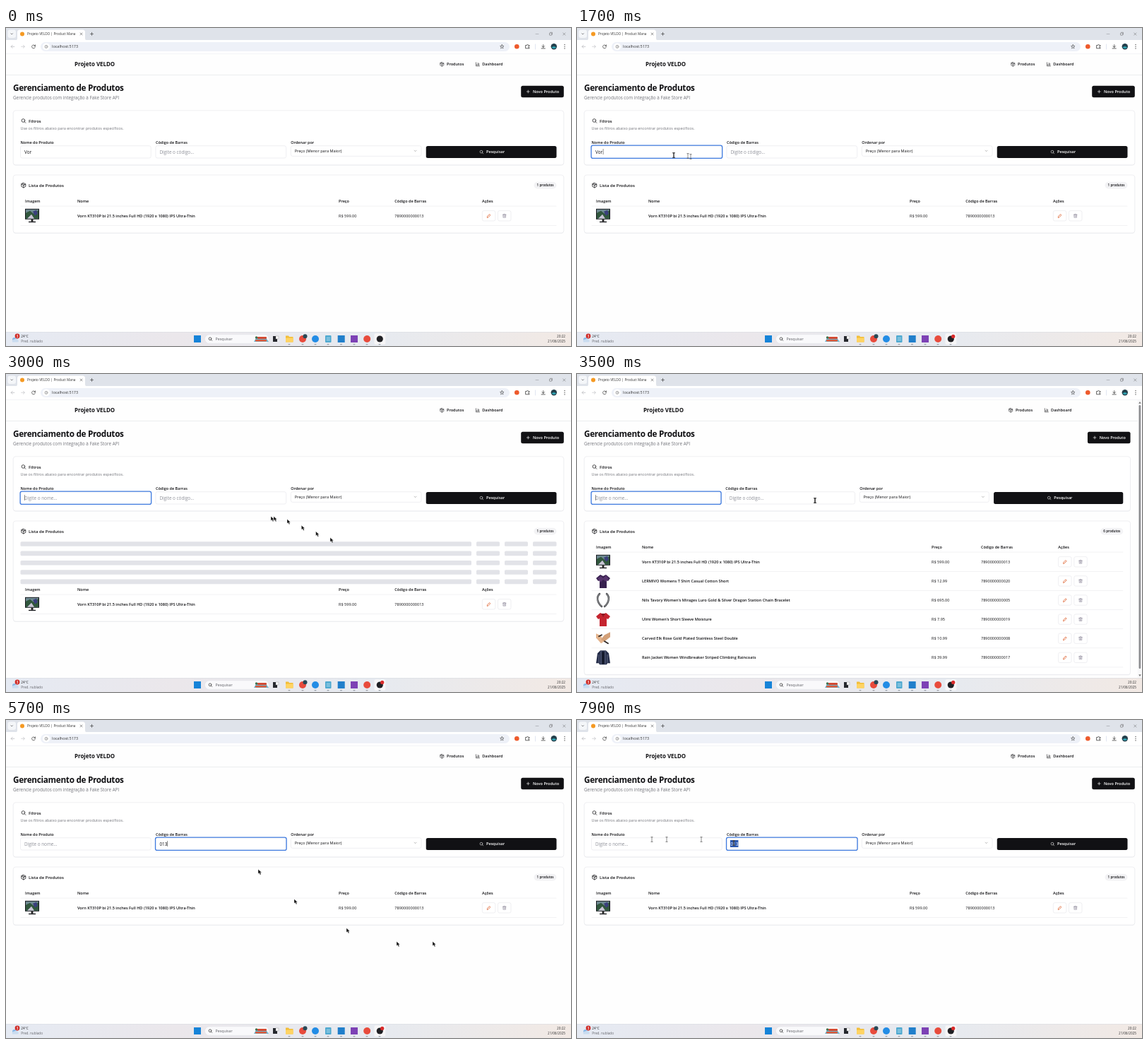
An HTML page for the animation above (8000 ms loop, 800 by 450 pixels).

```html
<!DOCTYPE html>
<html lang="pt-BR">
<head>
<meta charset="utf-8">
<title>Gerenciamento de Produtos</title>
<style>
  html, body { margin: 0; width: 100%; height: 100%; overflow: hidden; background: #fff; }
  svg { display: block; width: 800px; height: 450px; font-family: "Open Sans", "Noto Sans", sans-serif; }
</style>
</head>
<body>
<svg id="stage" viewBox="0 0 800 450" xmlns="http://www.w3.org/2000/svg"></svg>
<script>
const LOOP = 8000, STEP = 100;
const INK = '#111114', MUTED = '#73747b', LINE = '#e4e5e9', BLUE = '#3f7be0';
const stage = document.getElementById('stage');

// --- drawing helpers -------------------------------------------------
const rect = (x, y, w, h, fill, r = 0, stroke = 'none', sw = .6) =>
  `<rect x="${x}" y="${y}" width="${w}" height="${h}" rx="${r}" fill="${fill}" stroke="${stroke}" stroke-width="${sw}"/>`;
const dot = (x, y, r, fill) => `<circle cx="${x}" cy="${y}" r="${r}" fill="${fill}"/>`;
const path = (d, fill) => `<path d="${d}" fill="${fill}"/>`;
const line = (d, stroke = INK, sw = .7) =>
  `<path d="${d}" fill="none" stroke="${stroke}" stroke-width="${sw}" stroke-linecap="round" stroke-linejoin="round"/>`;
const text = (s, x, y, size = 5.55, weight = 400, fill = INK, anchor = 'start') =>
  `<text x="${x}" y="${y}" font-size="${size}" font-weight="${weight}" fill="${fill}" text-anchor="${anchor}">${s.replace(/&/g, '&amp;')}</text>`;
const group = (x, y, body) => `<g transform="translate(${x} ${y})">${body}</g>`;

const ICONS = {
  search: 'M18 11a7 7 0 1 1-14 0a7 7 0 0 1 14 0M16 16l5 5',
  box: 'M12 2l9 5v10l-9 5l-9-5V7zM3 7l9 5l9-5M12 12v10M7.5 4.5l9 5',
  chart: 'M3 3v18h18M8 17v-4M13 17V5M18 17V9',
  plus: 'M5 12h14M12 5v14',
  chevron: 'M6 9l6 6l6-6',
  trash: 'M3 6h18M5 6v15h14V6M8 6V3h8v3M10 11v6M14 11v6',
  pencil: 'M3 21l1-6L16 3l5 5L9 20z',
  back: 'M20 12H4M11 5l-7 7l7 7',
  forward: 'M4 12h16M13 5l7 7l-7 7',
  reload: 'M20 8a9 9 0 1 0 1 6M21 3v6h-6',
  info: 'M22 12a10 10 0 1 1-20 0a10 10 0 0 1 20 0M12 11v6M12 7v.5',
  star: 'M12 2l3 7h7l-6 5l2 8l-6-5l-6 5l2-8l-6-5h7z',
  puzzle: 'M4 7h5a3 3 0 1 1 6 0h5v5a3 3 0 1 0 0 5v4H4z',
  download: 'M12 3v12M6 10l6 6l6-6M3 21h18',
  cross: 'M5 5l14 14M19 5L5 19'
};
const icon = (name, cx, cy, size, color = INK, width = 2) =>
  `<path d="${ICONS[name]}" transform="translate(${cx - size / 2} ${cy - size / 2}) scale(${size / 24})" fill="none" stroke="${color}" stroke-width="${width}" stroke-linecap="round" stroke-linejoin="round"/>`;

// --- product data ----------------------------------------------------
const shirt = color => path('M6 1l4 2l4-2l6 5l-3 4l-2-1v11H5V9l-2 1l-3-4z', color);
const thumbs = {
  monitor: rect(0, 0, 20, 15, '#17191f') + rect(1, 1, 18, 13, '#6f8a92') +
    path('M1 6l6-3l5 4l7-5v12H1z', '#31573d') + path('M3 14l6-6l4 6z', '#c9c4d6') +
    path('M11 4l5-2l2 5l-4 3z', '#3a3f7d') + rect(8.5, 15, 3, 3, '#222') + rect(5, 18, 10, 1.3, '#15161a'),
  tee: shirt('#38214f') + path('M2 6l5-3l3 3l4-4l4 5l-4 4l-4-3l-4 4z', '#56356d'),
  bracelet: line('M5 1C0 6 2 14 8 19M15 1C20 6 18 14 12 19', '#44464a', 2.5) +
    line('M5 1C0 6 2 14 8 19M15 1C20 6 18 14 12 19', '#d8d8d8', .6),
  top: shirt('#c5242f') + path('M7 2l3 5l3-5z', '#8e1822'),
  rings: path('M0 3l7 3l3 9l-3 2l-7-8z', '#e4b48d') + path('M20 1l-8 4l-5 6l4 4l9-7z', '#d3a078') +
    line('M4 7l4-2M12 14l5 3', '#2b2523', 1.8),
  coat: path('M6 0h8l4 4l2 14h-4l-1 2H5l-1-2H0L2 4z', '#252d49') +
    line('M7 1v18M13 1v18M4 6v11M16 6v11', '#8691ad', .6) + rect(8.5, 2, 3, 17, '#121728')
};
const PRODUCTS = [
  ['monitor', 'Vorn KT310P bi 21.5 inches Full HD (1920 x 1080) IPS Ultra-Thin', '599.00', '13'],
  ['tee', 'LERMIVO Womens T Shirt Casual Cotton Short', '12.99', '20'],
  ['bracelet', 'Nils Tavory Women\'s Mirages Luro Gold & Silver Dragon Station Chain Bracelet', '695.00', '05'],
  ['top', 'Ulmi Women\'s Short Sleeve Moisture', '7.95', '19'],
  ['rings', 'Carved Elk Rose Gold Plated Stainless Steel Double', '10.99', '08'],
  ['coat', 'Rain Jacket Women Windbreaker Striped Climbing Raincoats', '39.99', '17']
];

// --- fixed surroundings ----------------------------------------------
const browser =
  rect(0, 0, 800, 18, '#dfe3ea') + rect(0, 17, 800, 20, '#fff') +
  rect(2.5, 2.5, 11.5, 11.5, '#f4f6f9', 3) + icon('chevron', 8.2, 8.4, 5, '#333', 3) +
  path('M13 17.5q3 0 3-3V6q0-3.500 3.500-3.500h89q3.500 0 3.500 3.500v8.500q0 3 3 3z', '#fff') +
  dot(23, 8.5, 3, '#f59a23') + text('Projeto VELDO | Product Mana', 30, 10.3, 4.75, 400, '#333') +
  icon('cross', 106.5, 8.4, 5, '#333', 2.6) + icon('plus', 121.5, 8.4, 7, '#333', 2.2) +
  line('M750 8.500h4', '#8a8d92', .5) + rect(769.5, 7, 3.2, 3.2, 'none', .5, '#555', .5) +
  line('M770.700 6.200h2.800v2.800', '#555', .4) + icon('cross', 790.3, 8.5, 5.5, '#555', 2) +
  icon('back', 9.5, 26.3, 7, '#a5a8ad') + icon('forward', 24, 26.3, 7, '#b9bbc0') + icon('reload', 39, 26.3, 6.5, '#333', 2.5) +
  rect(49, 20, 664, 13, '#eef1f8', 6.5) + dot(57, 26.4, 5, '#fff') + icon('info', 57, 26.4, 5, '#444') +
  text('localhost:5173', 65, 28.4, 5.5, 400, '#333') + icon('star', 702.3, 26.3, 6.5, '#333') +
  dot(723.3, 26.3, 3.3, '#ee5a2c') + icon('puzzle', 738.5, 26, 7.5, '#333', 2.4) +
  line('M749.500 23v7', '#cdd6e8', .6) + icon('download', 760.7, 26.3, 7, '#333', 2.6) +
  dot(775.8, 26.3, 4.2, '#243f4b') + path('M772.500 27.500q3.300-3 6.600 0q-3 3-6.600 0z', '#2fa5b4') +
  [23.7, 26.3, 28.9].map(y => dot(791, y, .65, '#333')).join('') + rect(0, 36.6, 800, .5, '#e2e4e8');

const ticks = [401, 420, 438, 456, 474.5, 493, 511, 529].map(x => rect(x - 1.5, 447.3, 3, .9, '#858a92', .4)).join('');
const taskbar = recording =>
  rect(0, 430, 800, 20, 'url(#bar)') + rect(0, 430, 800, .5, '#d5d8de') +
  dot(12, 441, 3, '#86b8e8') + path('M9 444.500q-1-4 3-4q4-3 5 1q2 3-1 3z', '#c9dcf0') +
  dot(16, 436, 3.4, '#cf2c27') + text('3', 16, 437.7, 4.5, 600, '#fff', 'middle') +
  text('24°C', 21.3, 438.4, 4.7, 400, '#252528') + text('Pred. nublado', 21.3, 444.8, 4.7, 400, '#65666c') +
  rect(266, 435, 10, 10, '#1683d8') +
  rect(281.5, 433.8, 91, 12.6, '#f9f9fb', 6.3, '#dcdde2', .4) + icon('search', 289.3, 440, 6.5, '#222', 2.5) +
  text('Pesquisar', 296.5, 442, 5.3, 400, '#5d5e64') +
  path('M351 444l4-7h12l5 7z', '#6db5ce') + rect(356, 437, 13, 3, '#d34a32', 1) + rect(353, 441, 16, 2.5, '#d95a3c', 1) + dot(354.5, 438, 1.7, '#41734f') +
  rect(378, 436, 6, 8, '#26282d') + rect(382, 436, 4, 4, '#f7f7f7', 0, '#777', .3) +
  path('M396 435.500h4l1 1.500h5.500v7.500H396z', '#f2bd38') + rect(396, 438.5, 10.5, 6, '#ffd463', .7) +
  dot(420, 440, 5, '#e84b3c') + dot(423.5, 436.3, 3, '#294957') +
  dot(438, 440, 5, '#238ce5') +
  rect(452, 435, 8.5, 10, '#4da8cf', 1) + line('M454 438h4.500M454 440h4.500M454 442h4.500', '#e3f4fb', .6) +
  rect(469.7, 435, 10, 10, '#217fcb') + rect(488, 435, 10, 10, '#7d42b5') + dot(511.2, 440, 5, '#e84b3c') +
  rect(521.5, 432.3, 15.8, 15.5, '#f7f6f7', 2) + dot(529.3, 440, 4.6, '#202024') +
  (recording ? dot(532.7, 436.4, 2.6, '#d92b2b') : '') + ticks +
  text('20:22', 792, 438.4, 4.7, 400, '#333', 'end') + text('21/06/2025', 792, 444.8, 4.7, 400, '#333', 'end');

const defs = `<defs><linearGradient id="bar">
  <stop offset="0" stop-color="#e5eaf3"/><stop offset=".3" stop-color="#ebe7eb"/>
  <stop offset=".65" stop-color="#e6eaf0"/><stop offset="1" stop-color="#f2e9e4"/></linearGradient></defs>`;

// --- page ------------------------------------------------------------
const card = (y, w, h) =>
  rect(10.2, y + .8, w, h, '#eeeff1', 3.5) + rect(10.2, y, w, h, '#fff', 3.5, LINE);

function field(x, w, value, hint, focused, selected) {
  const end = x + 5.5 + value.length * 3.6;
  return rect(x, 166.7, w, 17.3, '#fff', 2.5, LINE) +
    (focused ? rect(x - .4, 166.1, w + .8, 18.3, 'none', 2.5, BLUE, 1.3) : '') +
    (selected ? rect(x + 5, 170, 11.5, 10, '#2b58b0') : '') +
    text(value || hint, x + 5.5, 177.5, 6.33, 400, selected ? '#fff' : value ? INK : '#8d8f98') +
    (focused && !selected ? rect(end, 171, .5, 8, '#222') : '');
}

function table(width, count, top) {
  const wide = count === 1;
  const [name, price, code, act] = wide ? [101, 471, 550.3, 674] : [92, 502, 572, 681.3];
  const heads = [['Imagem', 27], ['Nome', name], ['Preço', price], ['Código de Barras', code], ['Ações', act]];
  let out = heads.map(([s, x]) => text(s, x, top + 246.6, 5.5, 600)).join('') +
    rect(20.5, top + 251.8, width - 41, .5, LINE);
  PRODUCTS.slice(0, count).forEach(([thumb, title, cost, suffix], i) => {
    const y = top + 265.8 + i * 27.1;
    out += group(27, y - 10, thumbs[thumb]) + text(title, name, y + 2, 5.58, 600) +
      text('R$ ' + cost, price, y + 2) + text('78900000000' + suffix, code, y + 2) +
      rect(act + .3, y - 7.2, 18.5, 14.4, '#fff', 2.3, LINE) + icon('pencil', act + 9.6, y, 6, '#dc5b27', 3.2) +
      rect(act + 22.5, y - 7.2, 18.5, 14.4, '#fff', 2.3, LINE) + icon('trash', act + 31.7, y, 6.3, '#8e8a9b', 2.4) +
      rect(20.5, y + 13.4, width - 41, .5, LINE);
  });
  return out;
}

function skeleton() {
  const bars = [[20.5, 638.5], [666, 33], [706, 33], [746, 33.5]];
  let out = '';
  for (let i = 0; i < 5; i++)
    for (const [x, w] of bars) out += rect(x, 237.2 + i * 13.35, w, 6.6, '#e2e3e8', 1.6);
  return out;
}

function page(s) {
  const W = s.count > 1 ? 793.75 : 800, mid = W / 2;
  const col = (W - 61) / 4, at = i => 20.5 + i * (col + 6.67);
  const top = s.loading ? 60 : 0;
  return rect(0, 37, 800, 393, '#fefefe') + rect(0, 66.3, W, .6, '#e1e2e6') +
    text('Projeto VELDO', mid - 303, 54.4, 7.95, 700) +
    icon('box', mid + 217.3, 51.3, 6.7) + text('Produtos', mid + 224, 53.3, 5.55, 600) +
    icon('chart', mid + 268, 51.3, 6.7) + text('Dashboard', mid + 274.2, 53.3, 5.55, 600) +
    `<g letter-spacing="-.29">${text('Gerenciamento de Produtos', 10, 89.2, 11.74, 700)}</g>` +
    text('Gerencie produtos com integração à Fake Store API', 10, 100.9, 6.32, 400, MUTED) +
    rect(W - 70.8, 81.7, 60.6, 16.6, INK, 2.5) + icon('plus', W - 60.7, 90, 6.5, '#fff', 2.3) + text('Novo Produto', W - 54, 92, 5.55, 600, '#fff') +
    card(116.8, W - 20.4, 77) + icon('search', 24.8, 131.3, 8, INK, 2.2) + text('Filtros', 32, 133.5, 5.9, 600) +
    text('Use os filtros abaixo para encontrar produtos específicos.', 20.5, 144.1, 5.47, 400, MUTED) +
    ['Nome do Produto', 'Código de Barras', 'Ordenar por'].map((t, i) => text(t, at(i), 163.7, 5.5, 600)).join('') +
    field(at(0), col, s.name, 'Digite o nome...', s.focus === 'name') +
    field(at(1), col, s.code, 'Digite o código...', s.focus === 'code', s.selected) +
    rect(at(2), 166.7, col, 14.7, '#fff', 2.5, LINE) + text('Preço (Menor para Maior)', at(2) + 5.3, 176, 5.6) +
    icon('chevron', at(2) + col - 8.5, 173.9, 6, '#777') +
    rect(at(3), 167, col, 17, INK, 2.5) + icon('search', at(3) + 78.5, 175.4, 6.5, '#fff') + text('Pesquisar', at(3) + 85.3, 177.4, 5.55, 600, '#fff') +
    card(208, W - 20.4, 82 + top + (s.count - 1) * 27.1) + icon('box', 24.8, 222.6, 8, INK, 2.2) + text('Lista de Produtos', 32, 224.8, 5.95, 600) +
    rect(W - 52.5, 217.7, 32, 9.8, '#f3f3f5', 4.9) + text(s.count + ' produtos', W - 36.4, 224.3, 4.6, 600, INK, 'middle') +
    (s.loading ? skeleton() : '') + table(W, s.count, top) +
    (W < 800 ? rect(W, 37, 6.25, 393, '#f8f8f9') + rect(795.6, 44, 2.6, 373, '#8b8c8f', 1.3) +
      path('M797 39l1.800 2.700h-3.600zM797 428l1.800-2.700h-3.600z', '#777') : '');
}

// --- timeline --------------------------------------------------------
const stateAt = t => ({
  name: t < 2300 ? 'Vor' : '',
  code: t < 4300 ? '' : t < 4500 ? '0' : t < 4800 ? '01' : '013',
  focus: t < 1300 ? '' : t < 3600 ? 'name' : 'code',
  selected: t >= 7300,
  loading: t >= 2800 && t < 3200,
  count: t >= 3200 && t < 4500 ? 6 : 1,
  recording: t >= 300
});

// Pointer route as [ms, x, y]; positions between stops are interpolated.
const ROUTE = [
  [200, 530, 440], [600, 425, 330], [700, 405, 266], [740, 394, 244], [800, 358, 218],
  [1100, 137, 180], [1660, 137, 180], [1680, 157, 181], [1700, 161, 182], [2000, 161, 182],
  [2400, 560, 280], [2700, 560, 280], [2900, 461, 235], [2960, 400, 209], [2980, 381, 205], [3000, 377, 205],
  [3300, 337, 179], [5500, 337, 179], [5600, 359, 215], [5620, 359, 215], [5640, 410, 257], [5660, 484, 298],
  [5680, 555, 317], [5700, 606, 317], [5900, 640, 322], [6700, 640, 322], [7000, 222, 174],
  [7840, 222, 174], [7860, 176, 169], [7880, 127, 169], [7900, 106, 169], [8000, 60, 171]
];
function pointerAt(t) {
  const i = Math.max(1, ROUTE.findIndex(p => p[0] >= t));
  const [t0, x0, y0] = ROUTE[i - 1], [t1, x1, y1] = ROUTE[i];
  const k = (t - t0) / (t1 - t0);
  return [x0 + (x1 - x0) * k, y0 + (y1 - y0) * k];
}
const ARROW = '<path d="M-2-3.500v6l1.500-1.200l1.300 2.500l1.200-.6l-1.200-2.400h2z" fill="#111" stroke="#fff" stroke-width=".3"/>';
const BEAM = line('M-1.200-3.300h2.400M0-3.300v6.600M-1.200 3.300h2.400', '#444', .6);
function pointer(t) {
  let out = '';
  for (let lag = 100; lag >= 0; lag -= 20) {
    if (t - lag < 200) continue;
    const [x, y] = pointerAt(t - lag);
    const overField = y > 166 && y < 185 && x > 20 && x < 397;
    out += group(x, y, overField ? BEAM : ARROW);
  }
  return out;
}

let drawn = -1;
function frame(now) {
  const t = Math.floor((now % LOOP) / STEP) * STEP;
  if (t !== drawn) {
    const s = stateAt(t);
    stage.innerHTML = defs + browser + page(s) + taskbar(s.recording) + pointer(t);
    drawn = t;
  }
  requestAnimationFrame(frame);
}
const start = performance.now();
const tick = () => { frameAt(performance.now() - start); requestAnimationFrame(tick); };
function frameAt(ms) {
  const t = Math.floor((ms % LOOP) / STEP) * STEP;
  if (t === drawn) return;
  drawn = t;
  const s = stateAt(t);
  stage.innerHTML = defs + browser + page(s) + taskbar(s.recording) + pointer(t);
}
tick();
</script>
</body>
</html>
```
